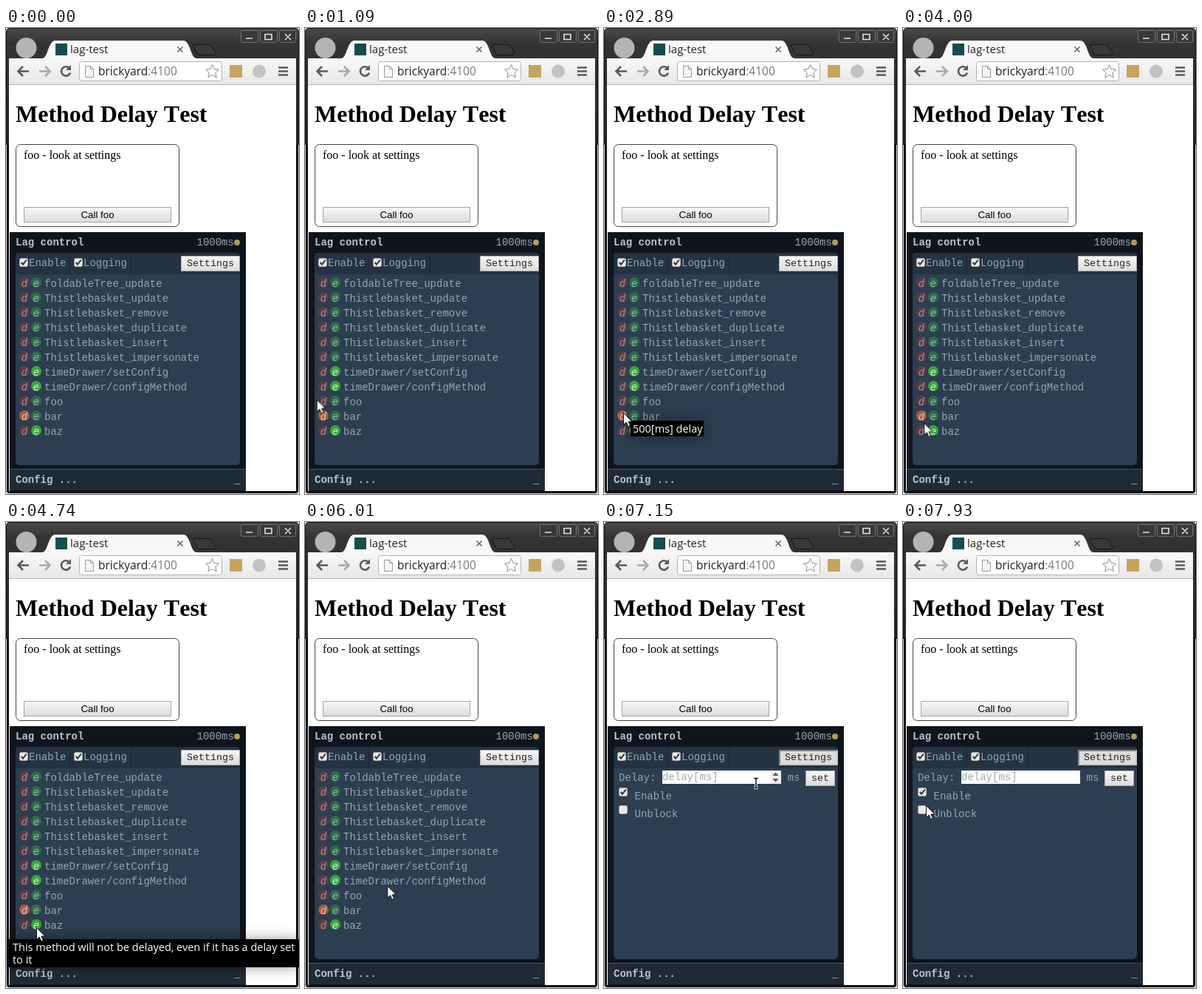
Write an HTML page that moves like this. It is 397 px wide and 630 px high and loops after 8 s.

```html
<!DOCTYPE html>
<html lang="en">
<head>
<meta charset="utf-8">
<title>Method Delay Test</title>
<style>
html, body { margin: 0; width: 100%; height: 100%; overflow: hidden; background: #fff; }
svg { display: block; width: 397px; height: 630px; }
text { white-space: pre; }
.mono { font: 14px "Liberation Mono", monospace; fill: #98a6b0; }
.bold { font-weight: bold; fill: #b9c5d0; }
.key { font: 13.333px "Liberation Mono", monospace; fill: #222; }
.ui { font: 14.5px "Open Sans", sans-serif; }
.serif { font: 16px "Liberation Serif", serif; font-kerning: none; }
.badge { font-style: italic; text-anchor: middle; }
.tip { fill: #fff; filter: drop-shadow(0 0 9px rgba(0, 0, 0, .4)); }

.tip, .list, .settings, .arrow, .beam, .spinner { animation: 8s step-end infinite; }
#tip1 { animation-name: tip1; }
#tip2 { animation-name: tip2; }
#tip3 { animation-name: tip3; }
.list { animation-name: leave; }
.settings { animation-name: enter; }
.beam, .spinner { animation-name: hover; }
.arrow { animation-name: unhover; }
.cursor { animation: move 8s linear infinite; }

@keyframes tip1 {
  0% { opacity: 0 } 25% { opacity: .35 } 25.5% { opacity: 1 }
  30.125% { opacity: .5 } 30.625%, 100% { opacity: 0 }
}
@keyframes tip2 {
  0% { opacity: 0 } 35.625% { opacity: .35 } 36.125% { opacity: 1 }
  45.25% { opacity: .5 } 45.75%, 100% { opacity: 0 }
}
@keyframes tip3 {
  0% { opacity: 0 } 58.75% { opacity: .35 } 59.25% { opacity: 1 }
  74.125% { opacity: .5 } 74.625%, 100% { opacity: 0 }
}
@keyframes leave { 0% { opacity: 1 } 84.375%, 100% { opacity: 0 } }
@keyframes enter { 0% { opacity: 0 } 84.375%, 100% { opacity: 1 } }
@keyframes hover { 0% { opacity: 0 } 87.875% { opacity: 1 } 91.375%, 100% { opacity: 0 } }
@keyframes unhover { 0% { opacity: 1 } 87.875% { opacity: 0 } 91.375%, 100% { opacity: 1 } }
@keyframes move {
  0%, 8.74% { transform: translate(-30px, 502px) }
  8.75% { transform: translate(-4px, 502px) }
  9.75%, 11.625% { transform: translate(6px, 508px) }
  14.125%, 17.375% { transform: translate(18px, 501px) }
  18.375%, 29.625% { transform: translate(25px, 504px) }
  32.5%, 44.75% { transform: translate(26px, 520px) }
  47% { transform: translate(23px, 509px) }
  49% { transform: translate(23px, 528px) }
  52.5%, 65.375% { transform: translate(41px, 548px) }
  66.875%, 73.625% { transform: translate(43px, 545px) }
  75.125% { transform: translate(111px, 492px) }
  79% { transform: translate(205px, 385px) }
  82.75%, 84.875% { transform: translate(268px, 310px) }
  89.375%, 90% { transform: translate(206px, 353px) }
  94% { transform: translate(69px, 391px) }
  95.5%, 97.125% { transform: translate(41px, 391px) }
  99.125%, 100% { transform: translate(31px, 383px) }
}
</style>
</head>
<body>
<svg viewBox="0 0 397 630">
  <defs>
    <linearGradient id="frame" x2="0" y2="1">
      <stop stop-color="#4a4a4a"/><stop offset=".12" stop-color="#343434"/><stop offset="1" stop-color="#242424"/>
    </linearGradient>
    <linearGradient id="bar" x2="0" y2="1"><stop stop-color="#f8f8f8"/><stop offset="1" stop-color="#e6e6e6"/></linearGradient>
    <linearGradient id="face" x2="0" y2="1"><stop stop-color="#f7f7f7"/><stop offset="1" stop-color="#dcdcdc"/></linearGradient>
    <g id="box"><rect x=".5" y=".5" width="11" height="11" rx="2" fill="#e8e8e8" stroke="#a8a8a8"/></g>
    <g id="checked"><use href="#box"/><path d="M2.7 6 5 8.7 9.8 2.5" fill="none" stroke="#333" stroke-width="2"/></g>
  </defs>

  <!-- window frame -->
  <rect width="397" height="630" rx="5" fill="#111"/>
  <rect x="1" y="1" width="395" height="157" rx="4" fill="url(#frame)"/>
  <path d="M.5 158V625Q.5 629.500 5 629.500H392Q396.500 629.500 396.500 625V158" fill="none" stroke="#ccc"/>
  <g fill="#383838" stroke="#717171">
    <rect x="318.500" y="3.500" width="23" height="16" rx="2"/>
    <rect x="344.500" y="3.500" width="23" height="16" rx="2"/>
    <rect x="370.500" y="3.500" width="22" height="16" rx="2"/>
  </g>
  <path d="M325 14H334M351 8.500H360V15.500H351ZM378 8 386 16M386 8 378 16" fill="none" stroke="#e4e4e4" stroke-width="1.600"/>
  <circle cx="27.500" cy="27" r="14" fill="#b4b4b4"/>
  <path d="M253.500 24Q253 22.500 255 22.500H275Q277 22.500 278 24L284 34Q284.500 36.500 282 36.500H262Q260 36.500 259 35Z" fill="#383838" stroke="#151515"/>

  <!-- tab and toolbar -->
  <rect x="4" y="41" width="389" height="36" fill="url(#bar)"/>
  <path d="M49 41C57 41 57 17 67 17H240C250 17 250 41 258 41Z" fill="#f8f8f8"/>
  <rect x="67" y="21" width="16" height="16" fill="#174c50"/>
  <text class="ui" x="87" y="34" style="font-size:15px" fill="#222">lag-test</text>
  <path d="M232.500 25.500 239.500 32.500M239.500 25.500 232.500 32.500" stroke="#666" stroke-width="1.600"/>
  <path d="M4 76.500H393" stroke="#b5b5b5"/>
  <g fill="none" stroke="#5a5a5a" stroke-width="2.600">
    <path d="M31 58.500H17M23 52 16.500 58.500 23 65"/>
    <path d="M45 58.500H58M53 52 59.500 58.500 53 65" stroke="#a9a9a9"/>
    <path d="M85.500 54A6.200 6.200 0 1 0 87 60.500"/>
    <path d="M369 53.500H382M369 58.500H382M369 63.500H382"/>
  </g>
  <path d="M88 50V57H81Z" fill="#5a5a5a"/>
  <rect x="99.500" y="45.500" width="193" height="26" rx="3" fill="#fff" stroke="#b3b3b3"/>
  <path d="M107.500 51.500H114.500L118.500 55.500V66.500H107.500ZM114.500 51.500V55.500H118.500" fill="#f5f5f5" stroke="#999"/>
  <text class="ui" x="125" y="64" style="font-size:15.500px" fill="#222">brickyard<tspan fill="#777">:4100</tspan></text>
  <path d="M279.500 49.500 282.200 55.500 288.500 56.200 283.800 60.500 285.200 66.800 279.500 63.500 273.800 66.800 275.200 60.500 270.500 56.200 276.800 55.500Z" fill="#fff" stroke="#8a8a8a"/>
  <rect x="303" y="50" width="17" height="17" fill="#c6a45e"/>
  <circle cx="343" cy="58.500" r="9" fill="#c2c2c2"/>

  <!-- page -->
  <rect x="4" y="77" width="389" height="549" fill="#fff"/>
  <text class="serif" x="13" y="127" style="font-size:32px;font-weight:bold">Method Delay Test</text>
  <rect x="13.500" y="157.500" width="221" height="111" rx="6" fill="#fff" stroke="#444"/>
  <text class="serif" x="24" y="177">foo - look at settings</text>
  <rect x="24.500" y="242.500" width="199" height="20" fill="url(#face)" stroke="#a5a5a5"/>
  <text x="124" y="257" text-anchor="middle" style="font:13.333px 'Liberation Sans',sans-serif">Call foo</text>

  <!-- console -->
  <rect x="5" y="276" width="320" height="350" fill="#0f151d"/>
  <text class="mono bold" x="13" y="294">Lag control</text>
  <text class="mono" x="258.500" y="294">1000ms</text>
  <circle cx="313" cy="290" r="4" fill="#b29b57"/>
  <rect x="13" y="304" width="304" height="287" rx="5" fill="#2c3e50"/>
  <path d="M13 333V309Q13 304 18 304H312Q317 304 317 309V333Z" fill="#233342"/>
  <path d="M86.500 304V333M169.500 304V333" stroke="#1a2733"/>
  <use href="#checked" x="18" y="311"/><text class="mono" x="31" y="322">Enable</text>
  <use href="#checked" x="92" y="311"/><text class="mono" x="105" y="322">Logging</text>
  <rect x="237.500" y="308.500" width="79" height="20" fill="url(#face)" stroke="#b0b0b0"/>
  <rect x="5" y="597" width="320" height="28" fill="#1e2b37"/>
  <path d="M5 596.500H325" stroke="#46535e"/>
  <text class="mono bold" x="13" y="615">Config ...</text>
  <text class="mono bold" x="309" y="615">_</text>

  <g class="list" id="list"></g>

  <g class="settings">
    <rect x="238" y="309" width="78" height="19" fill="#dcdcdc" stroke="#858585" stroke-width="2"/>
    <path d="M238 328H316V309" fill="none" stroke="#c8c8c8" stroke-width="2"/>
    <text class="mono" x="20" y="350">Delay:</text>
    <rect x="79" y="336" width="161" height="18" fill="#fff"/>
    <text class="mono" x="79" y="349" style="fill:#9fada6">delay[ms]</text>
    <g class="spinner">
      <rect x="225" y="336" width="15" height="18" fill="#ededed"/>
      <path d="M228.500 343 232.500 338.500 236.500 343ZM228.500 347 232.500 351.500 236.500 347Z" fill="#555"/>
    </g>
    <text class="mono" x="248.500" y="350">ms</text>
    <rect x="273.500" y="336.500" width="39" height="20" fill="url(#face)" stroke="#b0b0b0"/>
    <text class="key" x="281" y="350">set</text>
    <use href="#checked" x="20" y="359"/><text class="mono" x="41.500" y="375">Enable</text>
    <use href="#box" x="20" y="383"/><text class="mono" x="41.500" y="399">Unblock</text>
  </g>
  <text class="key" x="245" y="322">Settings</text>

  <!-- tooltips -->
  <g class="tip ui" id="tip1"><rect x="35" y="520" width="119" height="22" fill="#000"/><text x="38" y="536">No custom delay</text></g>
  <g class="tip ui" id="tip2"><rect x="36" y="531" width="99" height="21" fill="#000"/><text x="39" y="547">500[ms] delay</text></g>
  <g class="tip ui" id="tip3">
    <rect x="4" y="564" width="393" height="38" fill="#000"/>
    <text x="9" y="580">This method will not be delayed, even if it has a delay set</text>
    <text x="9" y="597">to it</text>
  </g>

  <g class="cursor">
    <path class="arrow" d="M.5 .5V16.500L4.200 13 6.700 18.800 9.400 17.600 6.900 12H11.800Z" fill="#fff" stroke="#111"/>
    <g class="beam" fill="none">
      <path d="M-3-6.500H3M0-6.500V6.500M-3 6.500H3" stroke="#fff" stroke-width="3.500"/>
      <path d="M-3-6.500H3M0-6.500V6.500M-3 6.500H3" stroke="#111" stroke-width="1.500"/>
    </g>
  </g>
</svg>
<script>
const methods = [
  "foldableTree_update",
  ...["update", "remove", "duplicate", "insert", "impersonate"].map(action => "Thistlebasket_" + action),
  "timeDrawer/setConfig", "timeDrawer/configMethod", "foo", "bar", "baz"
];
const delayed = ["bar"];
const exempt = ["timeDrawer/setConfig", "timeDrawer/configMethod", "baz"];

const badge = (letter, x, y, fill, ink) =>
  `<circle cx="${x}" cy="${y - 1}" r="7" fill="${fill}"/>
   <text class="mono badge" x="${x}" y="${y + 5}" style="fill:${ink}">${letter}</text>`;

document.getElementById("list").innerHTML = methods.map((name, i) => {
  const y = 345 + 20 * i;
  const d = delayed.includes(name) ? ["#a85c40", "#dcc4ba"] : ["#5c3a43", "#a0949a"];
  const e = exempt.includes(name) ? ["#3aa63c", "#d3ecd3"] : ["#2f6a4b", "#9ab5a8"];
  return badge("d", 25, y, ...d) + badge("e", 41, y, ...e) +
    `<text class="mono" x="52" y="${y + 5}">${name}</text>`;
}).join("");
</script>
</body>
</html>
```
